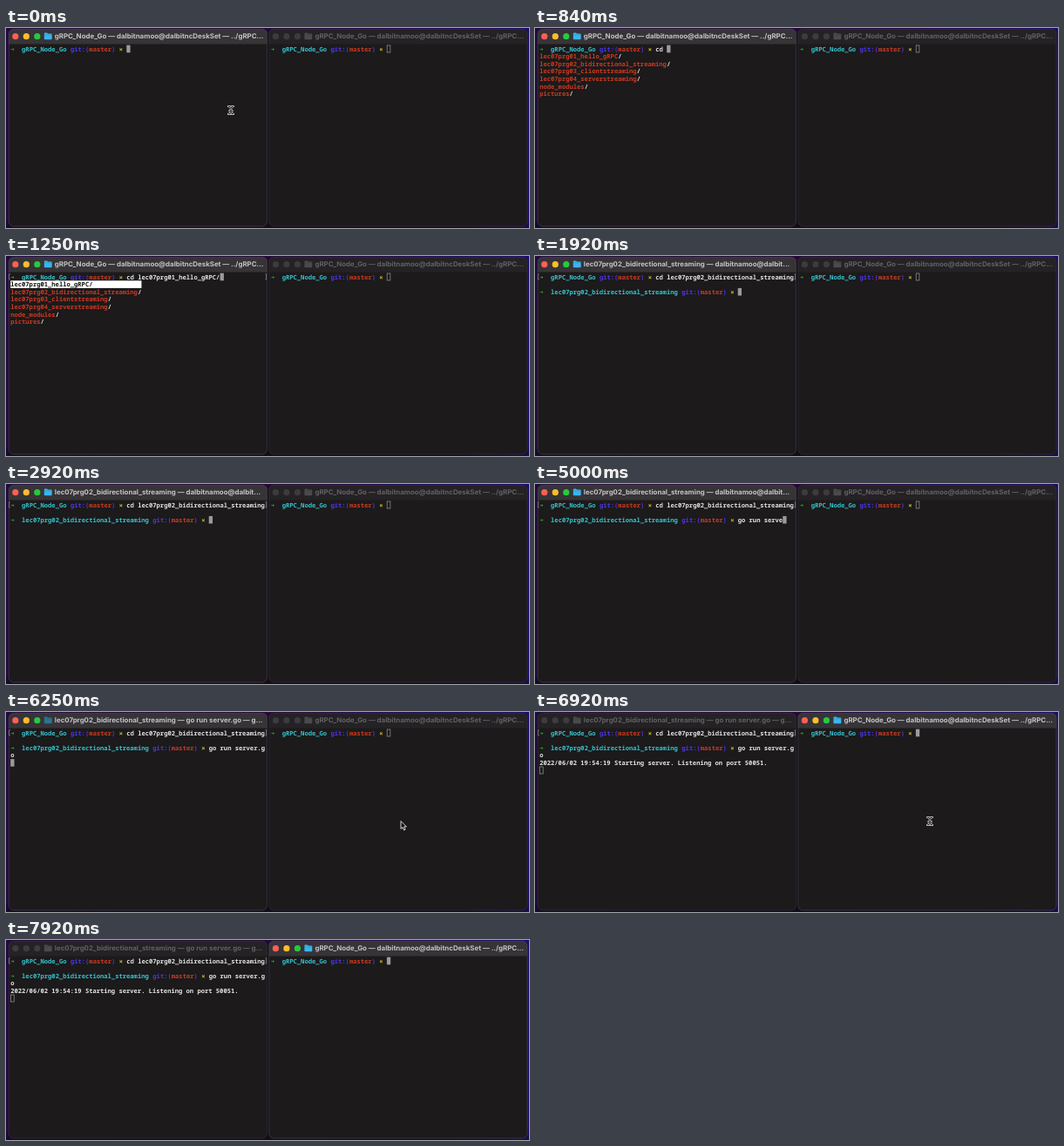
Write an HTML page that moves like this. It is 600 px wide and 230 px high and loops after 8000 ms.

```html
<!DOCTYPE html>
<html lang="en">
<head>
<meta charset="utf-8">
<title>Two terminals</title>
<style>
html, body { margin: 0; width: 100%; height: 100%; overflow: hidden; background: #150629; }
svg { display: block; width: 600px; height: 230px; }
text { white-space: pre; text-rendering: geometricPrecision; }
.mono { font: 700 7.155px "Noto Sans Mono", "DejaVu Sans Mono", monospace; }
.sign { font: 700 7.13px "DejaVu Sans Mono", monospace; }
.title { font: 700 7.9px Inter, sans-serif; }
</style>
</head>
<body>
<svg id="stage" viewBox="0 0 600 230"></svg>
<script>
const LOOP = 8000;
const COLS = 68, CHAR_W = 4.293, ROW_H = 8.6, TEXT_X = 5.2, BASELINE = 26.5;
const RIGHT_X = 298.6;
const COLOR = {
  green: '#2da82b', cyan: '#35c3cf', blue: '#4c36e6', red: '#cb3a20',
  yellow: '#c6bd35', white: '#e4e4e4', dark: '#1c1a1b', cursor: '#9b9b9b'
};
const REPO = 'gRPC_Node_Go';
const LESSON = 'lec07prg02_bidirectional_streaming';
const DIRS = ['lec07prg01_hello_gRPC', LESSON, 'lec07prg03_clientstreaming',
  'lec07prg04_serverstreaming', 'node_modules', 'pictures'];
const USER = 'dalbitnamoo@dalbitncDeskSet';
const TITLES = {
  repo: `${REPO} — ${USER} — ../gRPC...`,
  lesson: `${LESSON} — ${USER.slice(0, 12)}dalbit...`,
  server: `${LESSON} — go run server.go — g...`
};
const COMMAND = 'go run server.go';

// Moments of the session, in ms
const AT = {
  cd: 330, list: 830, first: 1080, second: 1400, accept: 1580, enter: 1750,
  type: 3600, key: 115, run: 5750, move: 5920, arrive: 6240,
  focus: 6660, listen: 6900, hide: 7300
};

const rect = (x, y, w, h, fill, extra = '') =>
  `<rect x="${x}" y="${y}" width="${w}" height="${h}" fill="${fill}" ${extra}/>`;
const label = (x, y, value, fill, kind) =>
  `<text class="${kind}" x="${x}" y="${y}" fill="${fill}">${value}</text>`;
const cellX = col => TEXT_X + col * CHAR_W;
const rowTop = row => 19.7 + row * ROW_H;
const print = (col, row, value, fill, kind = 'mono') =>
  label(cellX(col), BASELINE + row * ROW_H, value, fill, kind);

// Prints text that wraps at the window width and returns where it ends
function printWrapped(col, row, value) {
  let out = '';
  while (value) {
    const part = value.slice(0, COLS - col);
    out += print(col, row, part, COLOR.white);
    value = value.slice(part.length);
    col += part.length;
    if (col === COLS) { col = 0; row++; }
  }
  return { out, col, row };
}

function prompt(row, dir) {
  const git = 4 + dir.length;
  return print(0, row, '➜', COLOR.green, 'sign') +
    print(3, row, dir, COLOR.cyan) +
    print(git, row, 'git:(', COLOR.blue) +
    print(git + 5, row, 'master', COLOR.red) +
    print(git + 11, row, ')', COLOR.blue) +
    print(git + 13, row, '×', COLOR.yellow, 'sign');
}

function cursor(col, row, active) {
  return active
    ? rect(cellX(col), rowTop(row), 4.3, 8.6, COLOR.cursor)
    : rect(cellX(col) + .3, rowTop(row) + .3, 3.7, 8, 'none',
      `stroke="${COLOR.cursor}" stroke-width=".7"`);
}

const marks = () =>
  `<path d="M5 20.8H3.6V27H5M297.4 20.8H298.6V27H297.4" fill="none" stroke="#929292" stroke-width=".7"/>`;

function menu(row, selected) {
  return DIRS.map((dir, i) => {
    const on = i === selected;
    return (on ? rect(TEXT_X, rowTop(row + i), 35 * CHAR_W, ROW_H, '#fff') : '') +
      print(0, row + i, dir, on ? '#111' : COLOR.red) +
      print(dir.length, row + i, '/', on ? '#111' : COLOR.white);
  }).join('');
}

function changingDirectory(t) {
  let typed = 'cd '.slice(0, Math.max(0, Math.floor((t - AT.cd) / 130) + 1));
  const selected = t < AT.first ? -1 : t < AT.second ? 0 : 1;
  if (selected >= 0) typed += DIRS[selected] + '/';
  const line = printWrapped(31, 0, typed);
  return prompt(0, REPO) + line.out + cursor(line.col, line.row, true) +
    (selected >= 0 ? marks() : '') +
    (t >= AT.list && t < AT.accept ? menu(line.row + 1, selected) : '');
}

function runningServer(t) {
  const count = Math.max(0, Math.floor((t - AT.type) / AT.key));
  const line = printWrapped(53, 2, COMMAND.slice(0, count));
  let end = line;
  let out = prompt(0, REPO) + print(31, 0, 'cd ' + LESSON, COLOR.white) + marks() +
    prompt(2, LESSON) + line.out;
  if (t >= AT.run) end = { col: 0, row: 4 };
  if (t >= AT.listen) {
    out += print(0, 4, '2022/06/02 19:54:19 Starting server. Listening on port 50051.', COLOR.white);
    end = { col: 0, row: 5 };
  }
  return out + cursor(end.col, end.row, t < AT.focus);
}

function terminal(x, active, title, folder, content) {
  const lights = active ? ['#ff5f57', '#febc2e', '#28c840'] : Array(3).fill('#3d3b3e');
  const dots = lights.map((c, i) =>
    `<circle cx="${10.8 + i * 12.5}" cy="9.7" r="3.6" fill="${c}"/>`).join('');
  const icon = active ? folder : '#4b4b4c';
  return `<g transform="translate(${x})">` +
    rect(3, 1.2, 296.6, 227, COLOR.dark, 'rx="5.5"') +
    `<path d="M3 18.5V6.7a5.5 5.5 0 0 1 5.5-5.5H294.1a5.5 5.5 0 0 1 5.5 5.5V18.5Z" fill="${active ? '#363437' : '#242224'}"/>` +
    rect(3.2, 1.4, 296.2, 226.6, 'none',
      `rx="5.5" stroke="${active ? '#4c484f' : '#38353b'}" stroke-width=".6"`) +
    dots +
    `<path d="M43.8 6.4q0-.8.8-.8h2.5l1 1h3.7q.9 0 .9.8v5.1q0 .8-.9.8h-7.2q-.8 0-.8-.8Z" fill="${icon}"/>` +
    rect(43.8, 7.7, 8.9, .5, '#000', 'opacity=".25"') +
    label(55.8, 12.4, title, active ? '#c4c3c5' : '#626163', 'title') +
    content + '</g>';
}

const iBeam = (x, y) => {
  const d = 'M-2.7-4.4Q0-4.4 0-2.6V2.6Q0 4.4-2.7 4.4M2.7-4.4Q0-4.4 0-2.6M0 2.6Q0 4.4 2.7 4.4M-1.4 .8H1.4';
  return `<g transform="translate(${x} ${y})" fill="none" stroke-linecap="round">` +
    `<path d="${d}" stroke="#eee" stroke-width="2.4"/><path d="${d}" stroke="#111" stroke-width="1"/></g>`;
};
const arrow = (x, y) =>
  `<path transform="translate(${x} ${y})" d="M0 0V8.9L2 7 3.5 10.4 5.1 9.7 3.6 6.4H6.4Z" fill="#111" stroke="#eee" stroke-width=".9"/>`;

function pointer(t) {
  if (t < AT.cd) return iBeam(258, 94.5);
  if (t < AT.move || t >= AT.hide) return '';
  const p = Math.min(1, (t - AT.move) / (AT.arrive - AT.move));
  const ease = p * p * (3 - 2 * p);
  const x = 258 + 195 * ease, y = 94.5 + 31 * ease;
  return x < 300 || t >= AT.focus ? iBeam(x, y) : arrow(x, y);
}

// Wallpaper, darkened by the window shadows between and below the windows
const backdrop = `<defs><linearGradient id="desk" x2="1">
  <stop offset="0" stop-color="#220940"/><stop offset=".5" stop-color="#260838"/>
  <stop offset="1" stop-color="#1d0a70"/></linearGradient>
  <linearGradient id="floor" x2="1"><stop offset="0" stop-color="#150b2c"/>
  <stop offset=".85" stop-color="#130a20"/><stop offset="1" stop-color="#1a0a58"/></linearGradient></defs>` +
  rect(0, 0, 600, 230, 'url(#desk)') +
  rect(0, 222, 600, 8, 'url(#floor)') +
  rect(296, 6, 10, 224, '#140d18');

function scene(t) {
  const leftActive = t < AT.focus;
  const running = t >= AT.run;
  const title = running ? TITLES.server : t >= AT.enter ? TITLES.lesson : TITLES.repo;
  const left = t < AT.enter ? changingDirectory(t) : runningServer(t);
  const right = prompt(0, REPO) + cursor(31, 0, !leftActive);
  return backdrop +
    terminal(0, leftActive, title, running ? '#2f7394' : '#3bb5ee', left) +
    terminal(RIGHT_X, !leftActive, TITLES.repo, '#3bb5ee', right) +
    pointer(t);
}

const stage = document.getElementById('stage');
const start = performance.now();
let shown = '';
function draw() {
  const next = scene((performance.now() - start) % LOOP);
  if (next !== shown) stage.innerHTML = shown = next;
  requestAnimationFrame(draw);
}
draw();
</script>
</body>
</html>
```
